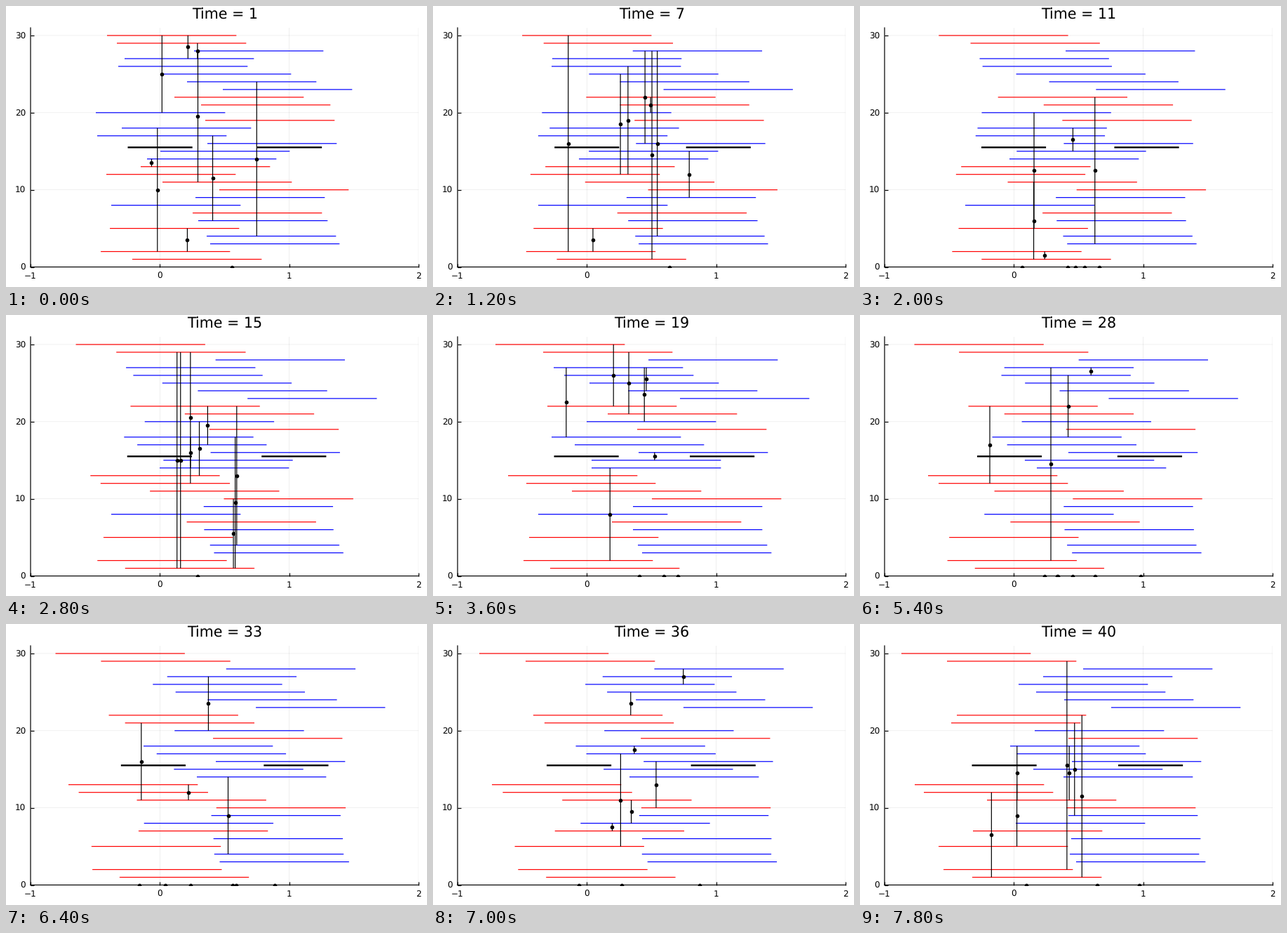
A matplotlib script that plays this animation: 600x400 px, repeating every 8 s.

```python
import numpy as np
import matplotlib.pyplot as plt
from matplotlib.animation import FuncAnimation
from matplotlib.collections import LineCollection

W, H, PT = 600, 400, 0.72          # stage in pixels, points per pixel
LEFT, RIGHT, TOP, BOTTOM = 35, 588, 31, 371.5
UNIT = (RIGHT - LEFT) / 3
STEPS, BILLS = 40, 10
THIN = 1.2 * PT

plt.rcParams["font.family"] = "DejaVu Sans"
plt.rcParams["text.hinting"] = "none"

# Left end of each bar, in stage pixels, at the start, middle and end
KEYS = [1, 19, 40]
RED = {
    30: (144, 89, 59), 29: (158, 157, 124), 22: (240, 163, 138),
    21: (278, 249, 130), 19: (284, 291, 297), 13: (192, 107, 78),
    12: (143, 133, 91), 11: (223, 198, 181), 10: (304, 312, 294),
    7: (266, 255, 161), 5: (148, 137, 112), 2: (135, 129, 119),
    1: (180, 167, 160),
}
BLUE = {
    28: (268, 307, 318), 27: (169, 172, 261), 26: (160, 187, 226),
    25: (222, 223, 251), 24: (258, 278, 291), 23: (309, 352, 358),
    20: (128, 219, 249), 18: (165, 169, 214), 17: (130, 202, 223),
    16: (287, 293, 302), 15: (220, 226, 247), 14: (201, 226, 290),
    9: (270, 285, 297), 8: (150, 150, 222), 6: (274, 285, 301),
    4: (286, 292, 299), 3: (291, 298, 308),
}
PARTIES = [(173.5, 172.5, 159.5), (358, 366, 368)]

bars = {**RED, **BLUE}
times = np.arange(1, STEPS + 1)
rng = np.random.default_rng(4)


def draw_bill(t):
    """A bill as (x, low bar, high bar), or (x, 0, 0) when nobody deals."""
    x = rng.normal(288, 44)
    near = [k for k in sorted(bars)
            if 3 < x - np.interp(t, KEYS, bars[k]) < UNIT - 3]
    if len(near) < 2 or rng.random() < 0.24:
        return x, 0, 0
    return x, *sorted(rng.choice(near, 2, replace=False))


def travel(bar):
    """Path through the key points; a bar moves most when it deals."""
    effort = [1 + sum(bar in bill[1:] for bill in bills) for bills in steps]
    clock = np.cumsum(effort)
    return np.interp(clock, [clock[k - 1] for k in KEYS], bars[bar])


steps = [[draw_bill(t) for _ in range(BILLS)] for t in times]
paths = {k: travel(k) for k in bars}
party_paths = [np.interp(times, KEYS, p) for p in PARTIES]

fig = plt.figure(figsize=(W / 100, H / 100), dpi=100, facecolor="white")
ax = fig.add_axes([LEFT / W, 1 - BOTTOM / H,
                   (RIGHT - LEFT) / W, (BOTTOM - TOP) / H])
ax.set(xlim=(LEFT, RIGHT), ylim=(0, 31))
ax.set_xticks([LEFT + UNIT * k for k in range(4)], ["−1", "0", "1", "2"])
ax.set_yticks([0, 10, 20, 30])
ax.tick_params(direction="in", length=5 * PT, width=THIN, pad=7 * PT,
               labelsize=12 * PT)
ax.spines[["top", "right"]].set_visible(False)
for side in ("left", "bottom"):
    ax.spines[side].set(linewidth=THIN, snap=False)
ax.set_axisbelow(True)
ax.grid(color="black", alpha=0.1, linewidth=THIN / 2, snap=False)
title = fig.text((LEFT + RIGHT) / 2 / W + 0.001, 1 - 19 / H, "",
                 ha="center", va="baseline", size=20.7 * PT)


def lines(color, width, z):
    group = LineCollection([], colors=color, linewidths=width, zorder=z,
                           snap=False)
    return ax.add_collection(group, autolim=False)


red, blue = lines("red", THIN, 2), lines("blue", THIN, 2)
party, links = lines("black", 2 * THIN, 3), lines("black", THIN, 4)
dots, = ax.plot([], [], "o", color="black", markersize=5.6 * PT,
                markeredgewidth=0, snap=False, zorder=5)


def level(x, y, width):
    return [(x, y), (x + width, y)]


def update(i):
    bills = steps[i]
    title.set_text(f"Time = {i + 1}")
    red.set_segments([level(paths[k][i], k, UNIT) for k in RED])
    blue.set_segments([level(paths[k][i], k, UNIT) for k in BLUE])
    party.set_segments([level(p[i], 15.5, UNIT / 2) for p in party_paths])
    links.set_segments([[(x, a), (x, b)] for x, a, b in bills if b])
    dots.set_data([x for x, a, b in bills], [(a + b) / 2 for x, a, b in bills])
    return red, blue, party, links, dots, title


anim = FuncAnimation(fig, update, frames=STEPS, interval=200,
                     repeat=True, repeat_delay=0)
plt.show()
```
